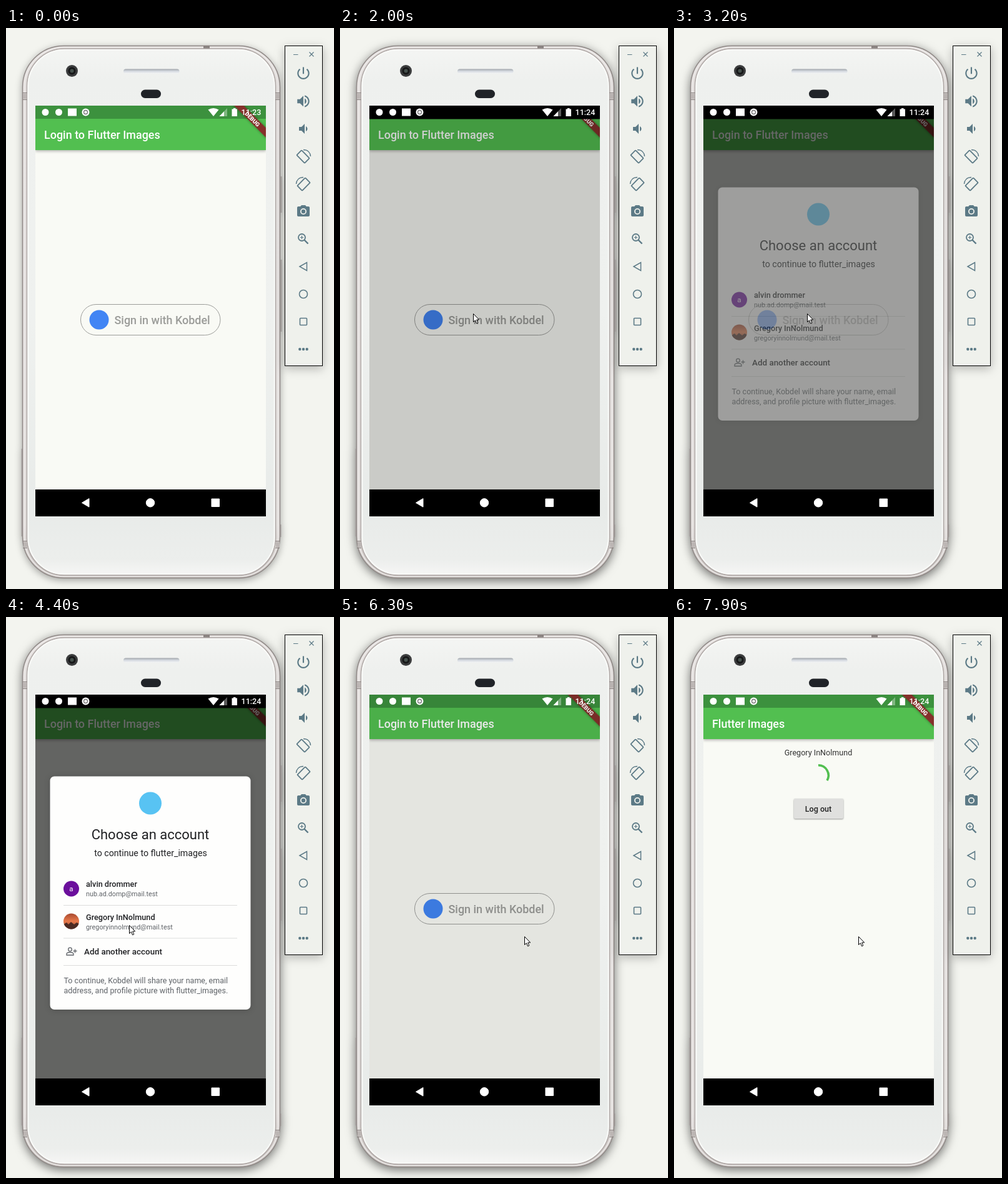
An HTML page that plays this animation: 525 by 896 pixels, repeating every 8 s.

```html
<!DOCTYPE html>
<html lang="en">
<head>
<meta charset="utf-8">
<title>Login flow</title>
<style>
  html, body { margin: 0; width: 100%; height: 100%; overflow: hidden; background: #f3f4ef; }
  svg { display: block; width: 525px; height: 896px; font-family: Roboto, sans-serif; }
  .mid { font-weight: 500; }
  .center { text-anchor: middle; }
  .tool { fill: #5c7a86; }
  .line { fill: none; stroke: #5c7a86; stroke-width: 1.8; }
  .name { font-size: 12.7px; font-weight: 500; fill: #202124; }
  .mail { font-size: 10.8px; fill: #5f6368; }
  .note { font-size: 12.5px; fill: #5f6368; }
  #bar { filter: drop-shadow(0 2px 2px #0004); }
  #logout { filter: drop-shadow(0 1px 1px #0006); }
  #panel { filter: drop-shadow(0 1px 5px #0003); }
  #ribbon { filter: drop-shadow(0 0 2px #0006); }
  #tools { filter: drop-shadow(0 4px 8px #0004); }
</style>
</head>
<body>
<svg viewBox="0 0 525 896">
  <defs>
    <linearGradient id="rim" x2="0" y2="1">
      <stop stop-color="#e3dfdd"/><stop offset=".9" stop-color="#e0dcda"/><stop offset="1" stop-color="#c4bebb"/>
    </linearGradient>
    <linearGradient id="face" x2="0" y2="1">
      <stop stop-color="#f4f5f3"/><stop offset=".06" stop-color="#eef0ee"/>
      <stop offset=".5" stop-color="#eff1ef"/><stop offset=".88" stop-color="#e8ebe9"/>
      <stop offset=".97" stop-color="#eceeec"/><stop offset="1" stop-color="#f6f6f5"/>
    </linearGradient>
    <linearGradient id="speaker" x2="0" y2="1">
      <stop stop-color="#9ea3a8"/><stop offset=".45" stop-color="#d4d9e0"/><stop offset="1" stop-color="#f4f5f5"/>
    </linearGradient>
    <linearGradient id="photo" x2="0" y2="1">
      <stop stop-color="#a5482f"/><stop offset=".5" stop-color="#e8794a"/><stop offset="1" stop-color="#7d3d2c"/>
    </linearGradient>
    <clipPath id="screen"><rect x="47" y="124" width="369" height="656"/></clipPath>
    <clipPath id="pill"><rect x="119" y="441" width="224" height="50" rx="25"/></clipPath>
    <clipPath id="avatar"><circle cx="104.5" cy="486" r="12.5"/></clipPath>
  </defs>

  <!-- phone body -->
  <g id="phone">
    <path d="M440.5 237v58M440.5 370v115M439.5 793v20M25.5 672v140" stroke="#a9a4a2" stroke-width="2"/>
    <rect x="26.5" y="28.5" width="412" height="850" rx="66" fill="url(#rim)" stroke="#8e8785" stroke-width="1.4"/>
    <rect x="29.5" y="31" width="406" height="845" rx="63" fill="none" stroke="#eeebea" stroke-width="1.5"/>
    <rect x="33.5" y="33" width="398" height="841" rx="60" fill="url(#face)" stroke="#aca4a2" stroke-width="1.4"/>
  </g>
  <rect x="35.5" y="35" width="394" height="837" rx="58" fill="none" stroke="#f8f9f7" stroke-width="2"/>
  <path d="M27 103.5h7M27 114.5h7M431 103.5h7M431 114.5h7M27 819.5h7M27 830.5h7M431 819.5h7M431 830.5h7" stroke="#8a8381"/>
  <path d="M27 109h6M432 109h6M28 825h6M432 825h6" stroke="#bcb6b4" stroke-width="9"/>
  <path d="M316 30.5h10" stroke="#8a8381" stroke-width="4"/>
  <circle cx="105.5" cy="68.5" r="9.5" fill="#3b3c3d"/>
  <circle cx="105.5" cy="68.5" r="6" fill="#171819"/>
  <circle cx="105.5" cy="68.5" r="3" fill="#45504c"/>
  <rect x="188" y="65.5" width="89.5" height="7.5" rx="3.7" fill="url(#speaker)"/>
  <rect x="216" y="98.5" width="32" height="13.5" rx="6.7" fill="#202328"/>

  <g clip-path="url(#screen)">
    <rect x="47" y="124" width="369" height="613" fill="#f9faf5"/>
    <g id="bar"><rect x="47" y="124" width="369" height="71" fill="#52bf50"/></g>
    <rect x="47" y="124" width="369" height="21" fill="#3c913e"/>
    <text id="title" class="mid" x="61" y="177" font-size="17.95" fill="#fff"></text>

    <g id="login">
      <g clip-path="url(#pill)"><circle id="splash" cx="213" cy="456" fill="#9e9e9e" opacity=".3"/></g>
      <rect x="119.5" y="441.5" width="223.5" height="49" rx="24.5" fill="none" stroke="#9c9d9a"/>
      <circle cx="149" cy="466" r="15.5" fill="#4285f4"/>
      <text class="mid" x="173.5" y="472.8" font-size="17.95" fill="#9b9c99">Sign in with Kobdel</text>
    </g>

    <g id="home" class="center">
      <text x="231" y="220.5" font-size="12.57" fill="#333">Gregory InNolmund</text>
      <path id="spinner" fill="none" stroke="#52bf50" stroke-width="3.6"/>
      <rect id="logout" x="192" y="290" width="79" height="32" rx="2" fill="#e0e0de"/>
      <text class="mid" x="231" y="310.5" font-size="12.57" fill="#222">Log out</text>
    </g>

    <g transform="translate(416 124) rotate(45)">
      <rect id="ribbon" x="-60" y="25.1" width="120" height="10.8" fill="#85302b"/>
      <text class="center" y="33.8" font-size="9.16" font-weight="900" fill="#fff">DEBUG</text>
    </g>

    <rect id="dim" x="47" y="124" width="369" height="613"/>

    <g id="dialog">
      <rect id="panel" x="70.5" y="254.5" width="321" height="372.5" rx="7" fill="#fefefd"/>
      <circle cx="231" cy="297.5" r="18" fill="#58c3f3"/>
      <g class="center" fill="#202124">
        <text x="231" y="354.5" font-size="22">Choose an account</text>
        <text x="231.5" y="382" font-size="14.2">to continue to flutter_images</text>
      </g>
      <circle cx="104.5" cy="434" r="12.5" fill="#6b0f9c"/>
      <text class="center" x="104.5" y="437.5" font-size="11.5" fill="#fff">a</text>
      <text class="name" x="128" y="431">alvin drommer</text>
      <text class="mail" x="128" y="446">nub.ad.domp@mail.test</text>
      <g clip-path="url(#avatar)">
        <rect x="92" y="473" width="25" height="26" fill="url(#photo)"/>
        <path d="M92 499v-8l5-3 3 3 4-4 5 4 4-3 4 2v9z" fill="#4b2a22"/>
      </g>
      <text class="name" x="128" y="483.5">Gregory InNolmund</text>
      <text class="mail" x="128" y="498.5">gregoryinnolmund@mail.test</text>
      <path d="M92 460.5h278M92 513h278M92 556.5h278" stroke="#dcdddc"/>
      <g fill="none" stroke="#5f6368" stroke-width="1.3">
        <circle cx="102.5" cy="531" r="2.8"/>
        <path d="M97 540v-1.5c0-4 11-4 11 0v1.5zM107.5 533.5h6M110.5 530.5v6"/>
      </g>
      <text class="name" x="125" y="538.5" style="font-size:13.4px">Add another account</text>
      <text class="note" x="92.5" y="585">To continue, Kobdel will share your name, email</text>
      <text class="note" x="92.5" y="601">address, and profile picture with flutter_images.</text>
    </g>

    <!-- system bars -->
    <rect id="blackBar" x="47" y="124" width="369" height="21.5"/>
    <g fill="#fff">
      <circle cx="63" cy="134.5" r="5.5"/>
      <circle cx="84.5" cy="134.5" r="5.5"/>
      <rect x="99" y="128.5" width="14" height="12"/>
      <circle cx="127.5" cy="134.5" r="6"/>
      <circle cx="127.5" cy="134.5" r="3" fill="none" stroke="#777" stroke-width="1.3"/>
      <path d="M332 141l-8.5-10.5q8.5-5 17 0z"/>
      <path d="M354 128v13h-12.5z" opacity=".35"/>
      <path d="M349 133.2v7.8h-7.5z"/>
      <path d="M361.5 129.5h2.5v-1.5h3.5v1.5h2.5v11.5h-8.5z"/>
      <text id="clock" class="mid" x="376.5" y="139" font-size="12.57"></text>
    </g>
    <rect x="47" y="737" width="369" height="43"/>
    <g fill="#fff" stroke="#fff" stroke-linejoin="round">
      <path d="M121.5 758.3l11.5-6.8v13.6z"/>
      <circle cx="231" cy="758.3" r="6.7"/>
      <rect x="329" y="752" width="12.5" height="12.5"/>
    </g>
  </g>

  <!-- emulator toolbar -->
  <rect id="tools" x="446.5" y="28.5" width="60" height="511" fill="#eff1ec" stroke="#000"/>
  <path d="M460 42.5h7.5M485.5 38.5l7 7M492.5 38.5l-7 7" stroke="#5c7a86" stroke-width="1.2"/>
  <g class="tool" fill-rule="evenodd">
    <path transform="translate(463 59.3) scale(1.08)" d="M13 3h-2v10h2V3zm4.83 2.17l-1.42 1.42C17.99 7.86 19 9.81 19 12c0 3.87-3.13 7-7 7s-7-3.13-7-7c0-2.19 1.01-4.14 2.58-5.42L6.17 5.17C4.23 6.82 3 9.26 3 12c0 4.97 4.03 9 9 9s9-4.03 9-9c0-2.74-1.23-5.18-3.17-6.83z"/>
    <path transform="translate(463 104) scale(1.08)" d="M3 9v6h4l5 5V4L7 9H3zm13.5 3c0-1.77-1.02-3.29-2.5-4.03v8.05c1.48-.73 2.5-2.25 2.5-4.02zM14 3.23v2.06c2.89.86 5 3.54 5 6.71s-2.11 5.85-5 6.71v2.06c4.01-.91 7-4.49 7-8.77s-2.99-7.86-7-8.77z"/>
    <path transform="translate(464 149)" d="M18.5 12c0-1.77-1.02-3.29-2.5-4.03v8.05c1.48-.73 2.5-2.25 2.5-4.02zM5 9v6h4l5 5V4L9 9H5z"/>
    <path transform="translate(464 281)" d="M9 2L7.17 4H4c-1.1 0-2 .9-2 2v12c0 1.1.9 2 2 2h16c1.1 0 2-.9 2-2V6c0-1.1-.9-2-2-2h-3.17L15 2H9zm3 15a5 5 0 1 1 0-10 5 5 0 0 1 0 10zm0-1.8a3.2 3.2 0 1 0 0-6.4 3.2 3.2 0 0 0 0 6.4z"/>
    <circle cx="470.3" cy="513" r="2.2"/><circle cx="476" cy="513" r="2.2"/><circle cx="481.7" cy="513" r="2.2"/>
  </g>
  <g class="line">
    <g transform="translate(476 205)">
      <g id="rotate">
        <rect x="-9" y="-5.5" width="18" height="11" rx="1" transform="translate(-.5 .5) rotate(45)"/>
        <path d="M0-10.5C7-10.5 11-6 11.5 0" stroke-width="1.5"/>
      </g>
    </g>
    <use href="#rotate" transform="translate(476 249) scale(-1 1)"/>
    <circle cx="473.5" cy="334.5" r="5.5"/>
    <path d="M477.5 338.5l6 6" stroke-width="2.4"/>
    <path d="M470.8 334.5h5.4M473.5 331.8v5.4" stroke-width="1.2"/>
    <path d="M470 381l11.5-6.5v13z" stroke-width="1.5"/>
    <circle cx="476" cy="425" r="6.5" stroke-width="1.6"/>
    <rect x="470.5" y="463.500" width="11" height="11" rx="1" stroke-width="1.6"/>
  </g>

  <path id="cursor" d="M.5.5v13l3-2.700 2 5 2.300-1-2.100-4.800h4z" fill="#fff" stroke="#000"/>
</svg>
<script>
const $ = id => document.getElementById(id);
const LOOP = 8000, STEP = 100;

const dimKeys = [[1800, 0], [2000, .19], [2200, .6], [6000, .6], [6100, .526], [6300, .085], [6400, .085], [6500, 0]];
const dialogKeys = [[3100, 0], [3200, .38], [3400, 1], [4600, 1], [4900, 0]];
const cursorKeys = [
  [600, 270, 431], [700, 270, 431], [1300, 208, 454], [1400, 208, 454], [1500, 213, 456],
  [4000, 213, 456], [4400, 197, 492], [4700, 197, 492], [4900, 270, 505], [5100, 270, 505], [5200, 295, 510]
];

// Linear interpolation between [time, ...values] keys.
function track(keys, t) {
  const next = keys.findIndex(k => k[0] > t);
  if (next < 0) return keys[keys.length - 1].slice(1);
  if (next === 0) return keys[0].slice(1);
  const a = keys[next - 1], b = keys[next], p = (t - a[0]) / (b[0] - a[0]);
  return a.slice(1).map((v, i) => v + (b[i + 1] - v) * p);
}

// cubic-bezier(.4, 0, .2, 1)
function fastOutSlowIn(x) {
  if (x <= 0 || x >= 1) return x <= 0 ? 0 : 1;
  let lo = 0, hi = 1, s = .5;
  for (let i = 0; i < 20; i++) {
    s = (lo + hi) / 2;
    const bx = 1.2 * s * (1 - s) ** 2 + .6 * s * s * (1 - s) + s ** 3;
    if (bx < x) lo = s; else hi = s;
  }
  return s * s * (3 - 2 * s);
}

function spinnerArc(u) {
  const head = fastOutSlowIn(u * 2), tail = fastOutSlowIn(u * 2 - 1);
  const start = Math.PI * (-.5 + 1.5 * tail + 1.7 * u);
  const sweep = Math.max(Math.PI * 1.5 * (head - tail), .01);
  const point = a => `${231 + 16.2 * Math.cos(a)} ${253 + 16.2 * Math.sin(a)}`;
  return `M${point(start)}A16.2 16.2 0 ${+(sweep > Math.PI)} 1 ${point(start + sweep)}`;
}

const show = (id, on) => { $(id).style.display = on ? '' : 'none'; };

function draw(t) {
  const home = t >= 7200;
  show('home', home);
  show('login', !home);
  $('title').textContent = home ? 'Flutter Images' : 'Login to Flutter Images';
  $('clock').textContent = t < 300 ? '11:23' : '11:24';
  $('spinner').setAttribute('d', spinnerArc((t - 6985) / 1333));

  show('splash', t >= 1700 && t < 1900);
  $('splash').setAttribute('r', t < 1800 ? 25 : 60);

  $('dim').style.opacity = track(dimKeys, t)[0];
  $('dialog').style.opacity = track(dialogKeys, t)[0];
  show('blackBar', t >= 1900 && t < 6300);

  const [x, y] = track(cursorKeys, t);
  show('cursor', t >= 600);
  $('cursor').setAttribute('transform', `translate(${Math.round(x)} ${Math.round(y)})`);
  $('phone').style.filter = t < 1500 ? 'drop-shadow(0 3px 6px #0005)' : 'drop-shadow(0 4px 8px #0008)';
}

let last = -1;
function tick() {
  const t = Math.floor(performance.now() % LOOP / STEP) * STEP;
  if (t !== last) draw(last = t);
  requestAnimationFrame(tick);
}
tick();
</script>
</body>
</html>
```
